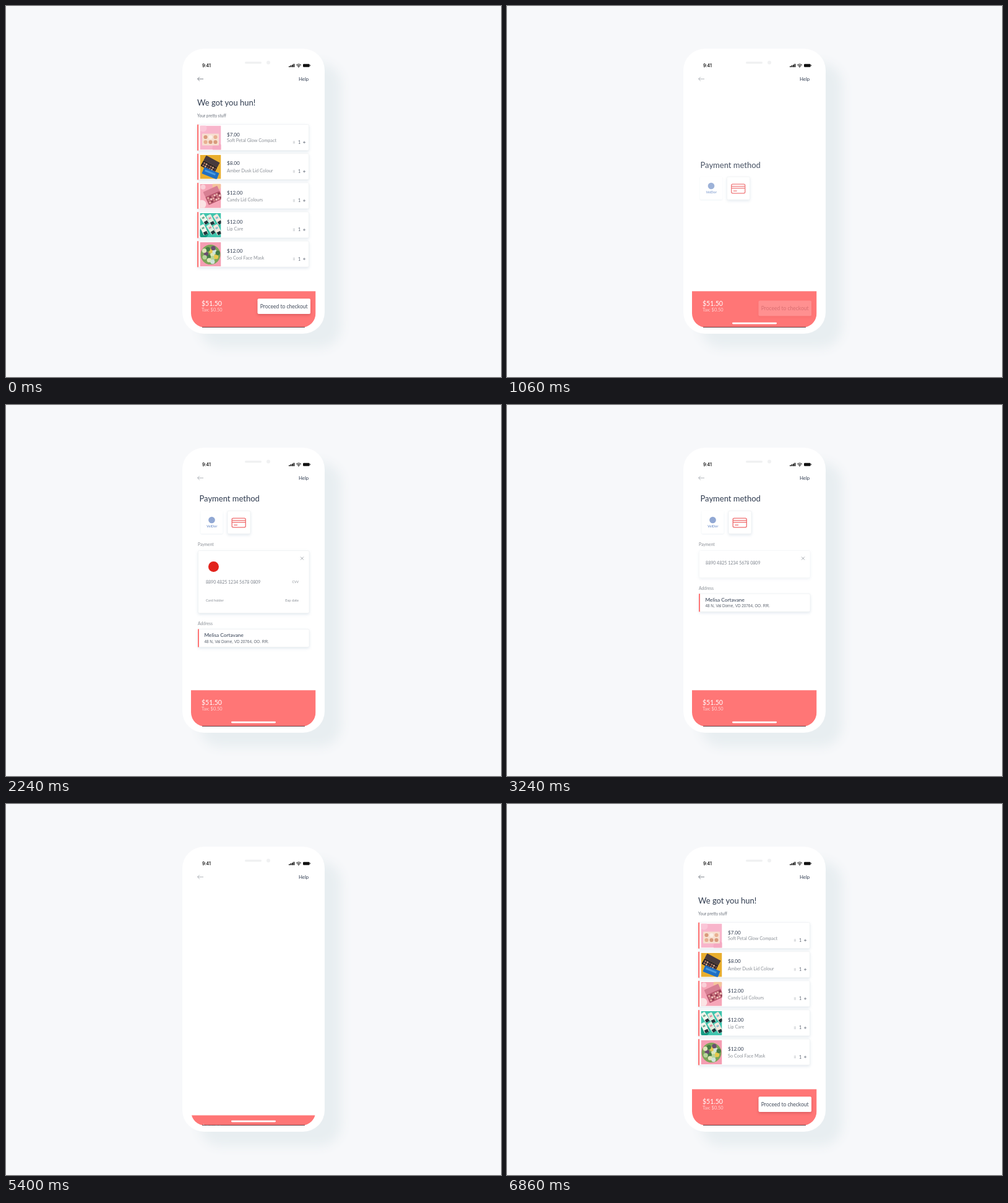
Animation of 800 by 600 pixels, one loop 6880 ms. Source, as an HTML page:

```html
<!DOCTYPE html>
<html lang="en">
<head>
<meta charset="utf-8">
<title>Checkout</title>
<style>
html, body { margin: 0; width: 100%; height: 100%; overflow: hidden; background: #f7f8fa; }
#phone { position: absolute; left: 285px; top: 69px; width: 230px; height: 461px; border-radius: 35px;
  background: #fff; box-shadow: 27px 23px 18px #e8eef1; }
svg { display: block; }
#stage { position: absolute; left: 0; top: 0; }
text { font-family: Lato, "Open Sans", sans-serif; white-space: pre; }
.card { fill: #fff; stroke: #eff1f3; stroke-width: .8; filter: drop-shadow(0 2px 2px rgba(130, 160, 185, .22)); }
.button { fill: #fff; filter: drop-shadow(0 2px 2px rgba(130, 30, 40, .28)); }
</style>
</head>
<body>
<div id="phone"></div>
<svg id="stage" width="800" height="600" viewBox="0 0 800 600"></svg>
<script>
const LOOP = 6880, RED = '#ff7676', INK = '#2f3b4f', GREY = '#8b9097';
const stage = document.getElementById('stage');

const text = (x, y, size, fill, str, more = '') =>
  `<text x="${x}" y="${y}" font-size="${size}" fill="${fill}" ${more}>${str}</text>`;
const rect = (x, y, w, h, fill, r = 0, more = '') =>
  `<rect x="${x}" y="${y}" width="${w}" height="${h}" rx="${r}" fill="${fill}" ${more}/>`;
const circle = (x, y, r, fill) => `<circle cx="${x}" cy="${y}" r="${r}" fill="${fill}"/>`;
const line = (d, color, width, more = '') =>
  `<path d="${d}" fill="none" stroke="${color}" stroke-width="${width}" ${more}/>`;
const card = (x, y, w, h, more = '') =>
  `<rect class="card" x="${x}" y="${y}" width="${w}" height="${h}" rx="2" ${more}/>`;
const group = (id, body, more = '') => `<g id="${id}" ${more}>${body}</g>`;
const turned = (angle, x, y, body) => `<g transform="translate(${x} ${y}) rotate(${angle})">${body}</g>`;
const times = (n, fn) => Array.from({ length: n }, (_, i) => fn(i)).join('');

// Product pictures, each 34 by 39
const pans = (cols, rows, gap, size, colors) => times(cols * rows, i =>
  rect(2 + i % cols * gap, 2 + Math.floor(i / cols) * gap, size, size, colors[i % colors.length], .5));
const photos = [
  rect(0, 0, 34, 39, '#f8b5cb') + circle(5, 4, 6, '#fac6d7') + circle(28, 36, 8, '#f5a9c2') +
    rect(3.5, 13, 27, 19, '#f7dfd0', 1) +
    times(6, i => circle(9 + i % 3 * 8, 18.5 + Math.floor(i / 3) * 8, 3.1, ['#d99a7c', '#e8b091', '#fbf0e8'][(i * 2) % 5 % 3])),
  rect(0, 0, 34, 39, '#e9ae2e') +
    turned(28, 10, 1, rect(0, 0, 25, 9, '#473a3d', 1) + rect(0, 9, 25, 10, '#231f25', 1) +
      `<g transform="translate(0 9)">${pans(6, 2, 3.9, 2.8, ['#a5705a', '#d0a184', '#6e4a48'])}</g>`) +
    turned(22, 7, 20, rect(0, 0, 26, 11, '#1f6fc4', 1) + rect(3, 3, 18, 3, '#4a9be0')),
  rect(0, 0, 34, 39, '#f6a6b8') + circle(27, 3, 7, '#f4c49c') + circle(3, 33, 7, '#fbe3e4') + circle(5, 5, 4, '#fad0d8') +
    turned(-24, 5, 13, rect(0, 0, 25, 9, '#d77f93', 1) + rect(0, 9, 25, 14, '#b8576d', 1) +
      `<g transform="translate(0 9)">${pans(6, 3, 3.8, 2.8, ['#e9b1a6', '#8a3b4b', '#cf7f83', '#f0cfc4'])}</g>`),
  rect(0, 0, 34, 39, '#3fc4ad') + circle(6, 32, 8, '#159a83') +
    times(6, i => turned(-32 + i % 2 * 6, -1 + i % 3 * 11, 5 + Math.floor(i / 3) * 16,
      rect(0, 0, 8, 17, ['#f3f6ee', '#dfeee0', '#f7e7dc'][i % 3], 1.5) + rect(1, 12, 6, 5, '#20353b') +
      rect(2, 4, 4, 3, ['#74a98e', '#e28fa0', '#8bbfd0'][i % 3]))),
  rect(0, 0, 34, 39, '#f59db2') + circle(17, 20, 16, '#7da458') +
    times(14, i => circle(17 + 12 * Math.cos(i * 2.4) * Math.sqrt((i + 1) / 14), 20 + 13 * Math.sin(i * 2.4) * Math.sqrt((i + 1) / 14),
      3.6, ['#dfe6b9', '#467c46', '#e7c94e', '#b8d59b', '#6a4d70', '#cfe3dc'][i % 6]))
];

const products = [
  ['$7.00', 'Soft Petal Glow Compact'], ['$8.00', 'Amber Dusk Lid Colour'], ['$12.00', 'Candy Lid Colours'],
  ['$12.00', 'Lip Care'], ['$12.00', 'So Cool Face Mask']
];
const row = ([price, name], i) => {
  const y = 191.5 + i * 47.15, up = i ? 0 : 1;
  return group('row' + i,
    card(309.5, y, 180, 42) + rect(309, y, 2.2, 42.5, RED, 1) +
    `<svg x="313.5" y="${y + 2}" width="34" height="39">${photos[i]}</svg>` +
    text(357, y + 18.7 + up, 8.1, INK, price) + text(357, y + 29.9 - up, 7.3, GREY, name) +
    line(`M463.8 ${y + 27.5}h3.2m-3.2 1.5h3.2m-3.2 1.5h3.2`, '#b3b7bc', .6) +
    text(472, y + 31.4, 7, '#5a6270', '1') +
    line(`M480 ${y + 29}h4m-2 -2v4`, '#6d7480', .8));
};

const status =
  text(317, 99.2, 6.9, '#111', '9:41', 'style="font-family:Inter,sans-serif;font-weight:600"') +
  rect(386, 90, 27, 3.6, '#f0f1f2', 1.8) + circle(424, 91.6, 3, '#f0f1f2') +
  times(4, i => rect(457 + i * 2.5, 97.2 - i * 1.2, 1.8, 1.8 + i * 1.2, '#111', .4)) +
  line('M469.3 95.6q3.7 -3.2 7.4 0M470.7 97.2q2.3 -1.9 4.6 0', '#111', 1.2) + circle(473, 98.4, .9, '#111') +
  rect(480, 93.7, 10.6, 5, '#111', 1.2) + rect(491.2, 95.2, .9, 2, '#111', .4) +
  group('arrow', line('M319 118h-9.4m3.2 -3.2l-3.2 3.2l3.2 3.2', '#7e848c', 1)) +
  text(473, 120.7, 7.8, INK, 'Help');

const cart =
  group('heading', text(309, 161, 13, INK, 'We got you hun!')) +
  group('subhead', text(309, 180.4, 6.6, '#6c737d', 'Your pretty stuff')) +
  products.map(row).join('');

const methods =
  group('title', text(312.5, 156.2, 13, INK, 'Payment method')) +
  group('icons',
    `<g opacity=".75">${rect(314.5, 171, 36, 37, '#fff', 2, 'style="filter:drop-shadow(0 1px 1px rgba(130,160,185,.2))"')}` +
    circle(332.5, 186, 5.3, '#6d8cc6') +
    text(332.7, 197.5, 6, '#5f84c4', 'VelDor', 'text-anchor="middle" font-weight="700" font-style="italic"') + '</g>' +
    card(358, 171.2, 37, 37) +
    rect(365.2, 183.2, 22, 14.6, 'none', 2, 'stroke="#ef6b6d" stroke-width="1.3"') +
    line('M365 186.6h22.4M365 189.6h22.4M368.3 194.2h5.8', '#ef6b6d', 1.2));

const form =
  group('payLabel', text(310, 228.2, 6.7, GREY, 'Payment')) +
  group('cardForm', card(310.5, 235.5, 179.5, 101, 'id="cardBox"') +
    group('fields', circle(335.5, 261.5, 8.5, '#e2231c') +
      text(473, 288.3, 5.2, GREY, 'CVV', 'text-anchor="end"') + text(323, 318.4, 5.6, GREY, 'Card holder') +
      text(473, 318.4, 5.7, GREY, 'Exp date', 'text-anchor="end"')) +
    group('close', line('M476 245.5l5 5m0 -5l-5 5', '#8d939b', .8)) +
    group('number', text(323, 289, 7, '#7d838c', '8890 4825 1234 5678 0809'))) +
  group('saved', card(310.5, 235.3, 180, 29) + rect(310, 235, 2, 29.5, RED, .8) +
    text(321, 247.8, 8.1, INK, 'Tavorabank') + text(321, 256.7, 7, GREY, '8890 4825 **** **** ****')) +
  group('address', text(310, 356, 6.8, GREY, 'Address') +
    card(310.5, 362.5, 179.5, 29) + rect(310, 362.3, 2, 29.5, RED, .8) +
    text(320.5, 375.4, 8.3, INK, 'Melisa Cortavane') +
    text(320.5, 384.6, 6.35, '#5b626d', '48 N, Val Dorne, VD 20764, OO. RR.', 'style="font-family:\'Liberation Sans\',Arial,sans-serif"'));

const button = (id, label, size) => group(id,
  '<rect class="button" x="406.5" y="473.2" width="85.5" height="24.8" rx="2"/>' +
  text(449.2, 488.5, size, '#424b5b', label, 'text-anchor="middle"'));
const footer = group('bar',
  rect(299, 461.3, 201.5, 60, RED) + text(316, 484.6, 10.5, '#fff', '$51.50') +
  text(316, 494, 7.4, '#ffd3d3', 'Tax: $0.50') +
  button('proceed', 'Proceed to checkout', 8.5) + button('pay', 'Pay now!', 8.7));

stage.innerHTML =
  `<clipPath id="screen">${rect(299, 80, 201.5, 440, '#000', 23)}</clipPath>` +
  status + cart + group('methods', methods) + group('form', form) +
  group('clip', footer + group('home', rect(364, 511.8, 72, 2.6, '#fff', 1.3)), 'clip-path="url(#screen)"') +
  rect(317, 519.2, 166, .8, '#3c3038');

const $ = id => document.getElementById(id);
const put = (id, x, y, opacity) => {
  $(id).setAttribute('transform', `translate(${x} ${y})`);
  $(id).setAttribute('opacity', opacity);
};
const span = (t, a, b) => Math.min(1, Math.max(0, (t - a) / (b - a)));
const out = x => 1 - (1 - x) ** 3;
const inOut = x => x < .5 ? 4 * x ** 3 : 1 - 4 * (1 - x) ** 3;
const show = (t, a, b, c, d) => span(t, a, b) * (1 - span(t, c, d));

function draw(t) {
  // Cart leaves, then comes back row by row
  const back = t > LOOP / 2;
  for (let i = 0; i < 5; i++) {
    const leave = span(t, 300 + (4 - i) * 50, 640 + (4 - i) * 50);
    const enter = span(t, 5458 + i * 70, 6058 + i * 70);
    put('row' + i, 0, back ? 40 * (1 - out(enter)) : 30 * leave ** 2, back ? Math.min(1, enter * 1.15) : 1 - leave);
  }
  put('heading', 0, 0, back ? span(t, 5500, 5950) : 1 - span(t, 520, 840));
  put('subhead', 0, 0, back ? span(t, 5600, 6200) : 1 - span(t, 480, 800));
  put('arrow', 0, 0, back ? .6 + .4 * span(t, 6080, 6400) : 1 - .4 * span(t, 400, 800));

  // Payment choice appears in the middle and moves to the top
  const rest = 1 - inOut(span(t, 1240, 1740));
  const rise = 12 * (1 - out(span(t, 740, 1060)));
  put('title', 0, 106.3 * rest + rise, 1);
  put('icons', -2.5 * rest, 105 * rest + rise, 1);
  put('methods', 0, 0, show(t, 760, 1100, 5020, 5340));

  // Form enters, then folds into a saved card
  const fold = span(t, 2840, 3480);
  const shrink = 72.4 * inOut(fold);
  const enter = 20 * (1 - out(span(t, 1600, 2080)));
  put('form', 0, enter, show(t, 1600, 2000, 5000, 5300));
  $('cardBox').setAttribute('height', 101 - shrink);
  put('cardForm', 0, 0, 1 - span(t, 3360, 3620));
  $('cardBox').setAttribute('opacity', 1 - .45 * span(t, 2900, 3240));
  put('fields', 0, 0, 1 - span(t, 2840, 3060));
  const slide = inOut(span(t, 2820, 3360));
  put('number', -2 * slide, -32 * slide, 1);
  put('saved', 0, 0, span(t, 3400, 3680));
  put('address', 0, -shrink, 1);

  // Footer drops after paying and rises with the cart
  const drop = inOut(span(t, 5120, 5600)) - inOut(span(t, 5706, 6406));
  put('bar', 0, 59 * drop, 1);
  const gone = back ? 0 : span(t, 820, 1120);
  put('proceed', 0, 4 * gone, back && t < 5620 ? 0 : 1 - gone);
  put('pay', 0, 4 * (1 - out(span(t, 3800, 4140))), show(t, 3800, 4140, 5000, 5300));
  put('home', 0, 0, back ? 1 - span(t, 6380, 6660) : span(t, 500, 820));
}

function tick(now) {
  draw(now % LOOP);
  requestAnimationFrame(tick);
}
draw(0);
requestAnimationFrame(tick);
</script>
</body>
</html>
```
